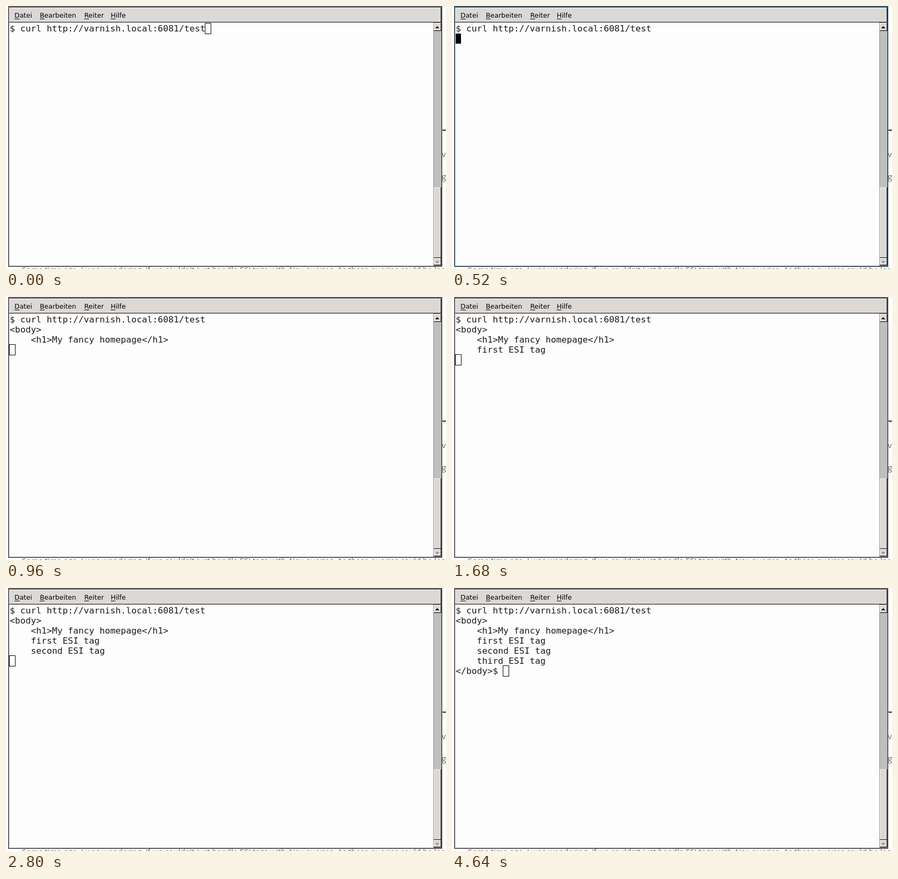
Recreate the animation shown at these times as an HTML page with a canvas. Size 832 by 496 pixels, loop 4.68 s.

```html
<!DOCTYPE html>
<html lang="de">
<head>
<meta charset="utf-8">
<style>
  html, body { margin: 0; width: 100%; height: 100%; overflow: hidden; background: #fff; }
  canvas { display: block; }
</style>
</head>
<body>
<canvas width="832" height="496"></canvas>
<script>
const ctx = document.querySelector('canvas').getContext('2d');
const LOOP = 4680;
const CELL = 10, LINE = 19, LEFT = 7, TOP = 33;
const PANEL = '#dcd8d6', LIGHT = '#f6f4f3', SHADE = '#95918f', INK = '#000';

const prompt = '$ curl http://varnish.local:6081/test';
// Output appended to the terminal, by start time in ms
const output = [
  [0, prompt],
  [520, '\n'],
  [600, '<body>\n    <h1>My fancy homepage</h1>\n'],
  [1680, '    first ESI tag\n'],
  [2760, '    second ESI tag\n'],
  [3840, '    third ESI tag\n</body>'],
  [3880, '$ ']
];

function rect(x, y, w, h, color) {
  ctx.fillStyle = color;
  ctx.fillRect(x, y, w, h);
}

function text(str, x, y, font, color = INK) {
  ctx.font = font;
  ctx.fillStyle = color;
  ctx.fillText(str, x, y);
}

function raised(x, y, w, h) {
  rect(x, y, w, h, INK);
  rect(x, y, w - 1, h - 1, LIGHT);
  rect(x + 1, y + 1, w - 2, h - 2, PANEL);
}

function arrow(x, y, dir, color) {
  for (let i = 0; i < 4; i++) rect(x - i, y + dir * i, 2 * i + 1, 1, color);
}

function drawPage() {
  const font = '15px "Open Sans", sans-serif';
  rect(0, 0, 832, 496, '#fff');
  text("Some time ago, I was wondering, if we couldn't just handle ESI tags with Ajax queries. As these queries could be loaded",
    30, 503, font, '#666');
  text('ve', 824, 285, font, '#666');
  text('g', 824, 327, font, '#666');
  rect(825, 233, 7, 2, '#444');
  rect(828, 235, 2, 1, '#444');
}

function drawWindow(focused) {
  rect(4, 0, 821, 492, focused ? '#33566b' : '#5c5c5c');
  raised(6, 3, 817, 28);
  rect(6, 31, 802, 459, '#fdfdfd');

  const font = '12.5px "DejaVu Sans", sans-serif';
  for (const [label, x] of [['Datei', 16], ['Bearbeiten', 64], ['Reiter', 148], ['Hilfe', 198]]) {
    text(label, x, 22, font);
    rect(x, 24, Math.round(ctx.measureText(label[0]).width), 1, INK);
  }

  rect(808, 31, 15, 459, SHADE);
  rect(809, 32, 14, 457, '#bfbfbd');
  raised(809, 32, 14, 15);
  raised(809, 342, 14, 133);
  raised(809, 475, 14, 14);
  arrow(815, 38, 1, INK);
  arrow(815, 484, -1, SHADE);
}

function drawTerminal(t, focused) {
  const shown = output.filter(([start]) => t >= start).map(([, str]) => str).join('');
  const lines = shown.split('\n');
  lines.forEach((line, row) => [...line].forEach((char, col) =>
    text(char, LEFT + col * CELL, TOP + row * LINE + 15, '16.6px "DejaVu Sans Mono", monospace', '#1a1a1a')));

  const x = LEFT + lines.at(-1).length * CELL;
  const y = TOP + (lines.length - 1) * LINE;
  if (focused) {
    rect(x, y, CELL, LINE, INK);
  } else {
    ctx.strokeStyle = INK;
    ctx.strokeRect(x - 0.5, y - 0.5, CELL + 1, LINE + 1);
  }
}

function frame(now) {
  const t = now % LOOP;
  const focused = t >= 160 && t < 960;
  drawPage();
  drawWindow(focused);
  drawTerminal(t, focused);
  requestAnimationFrame(frame);
}
frame(0);
</script>
</body>
</html>
```
